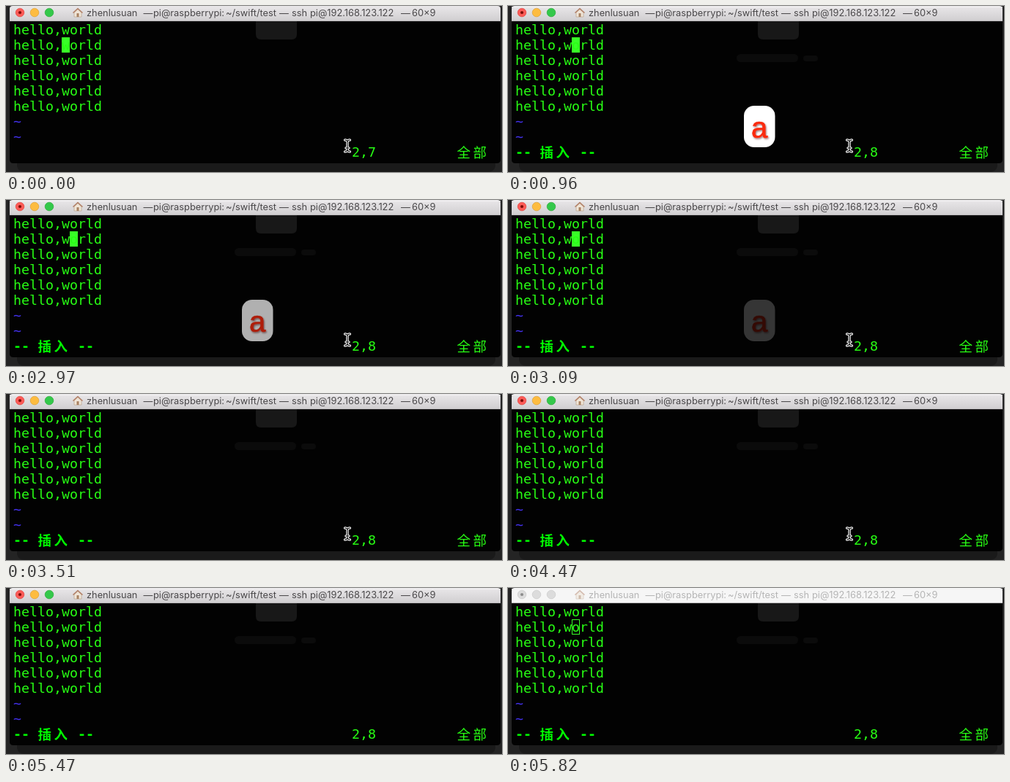
Recreate the animation shown at these times as an HTML page. Size 677x228 px, loop 5.98 s.

```html
<!DOCTYPE html>
<html lang="zh">
<head>
<meta charset="utf-8">
<title>Terminal</title>
<style>
  html, body { margin: 0; width: 100%; height: 100%; overflow: hidden; background: #242424; }
  svg { display: block; width: 677px; height: 228px; }
  text { white-space: pre; }
  .title { font: 12.8px Inter, Roboto, sans-serif; fill: #4a484a; }
  .mono { font: 18.27px "DejaVu Sans Mono", monospace; fill: #28fe14; }
  .cjk { font: 18.5px "Noto Sans CJK SC", "Noto Sans CJK", sans-serif; fill: #28fe14; }
  .bold { font-weight: 700; fill: #00ff00; }
  .tilde { fill: #4432f0; }
  .key { font: 40px "Liberation Sans", Arial, sans-serif; fill: #fb2a0b; stroke: #fb2a0b; stroke-width: .7; }
  .light { stroke-width: .7; }
  .idle .title { fill: #b5b5b5; }
  .idle .light { fill: #dcdcdc; stroke: #cbcbcb; }
  .idle .dot { fill: #8d8d8d; }
  .idle .house { opacity: .5; }
  .idle .bar { fill: #f6f6f6; }
</style>
</head>
<body>
<svg viewBox="0 0 677 228">
  <defs>
    <linearGradient id="chrome" x2="0" y2="1">
      <stop offset="0" stop-color="#e9e7e9"/>
      <stop offset="1" stop-color="#d0ced0"/>
    </linearGradient>
    <filter id="shade" x="-30%" y="-30%" width="160%" height="160%">
      <feDropShadow dx="1" dy="1.5" stdDeviation="1" flood-color="#5a1008" flood-opacity=".6"/>
    </filter>
  </defs>

  <rect width="677" height="228" fill="#242424"/>
  <path d="M15 214H668V220Q666 228 658 228H25Q17 228 15 220Z" fill="#1a1a1a"/>
  <path d="M5 20H675V211Q675 216 670 216H10Q5 216 5 211Z" fill="#020202"/>

  <path d="M341 20H397V39Q397 46 390 46H348Q341 46 341 39Z" fill="#181818"/>
  <g id="smudge" fill="#0b0b0b">
    <rect x="312" y="66" width="84" height="11" rx="5.5"/>
    <rect x="403" y="68" width="20" height="8" rx="4"/>
  </g>

  <g id="head">
    <path class="bar" d="M5 21V4Q5 0 9 0H671Q675 0 675 4V21Z" fill="url(#chrome)"/>
    <rect id="shine" x="5" y="1" width="670" height="1" fill="#f3f2f3"/>
    <rect x="5" y="20" width="670" height="1" fill="#b3b1b3"/>
    <circle class="light" cx="19" cy="9" r="5.8" fill="#fc5b57" stroke="#e2443f"/>
    <circle class="dot" cx="19" cy="9" r="2.1" fill="#7c0d09"/>
    <circle class="light" cx="39" cy="9" r="5.8" fill="#fdbc40" stroke="#dfa033"/>
    <circle class="light" cx="59" cy="9" r="5.8" fill="#34c84a" stroke="#27aa35"/>
    <g class="house">
      <path d="M93 9L98 4.5L103 9V15H93Z" fill="#efe4d6" stroke="#b9a48f" stroke-width=".7"/>
      <path d="M91.5 9.5L98 3.5L104.5 9.5" fill="none" stroke="#b27f66" stroke-width="1.6"/>
      <rect x="96.5" y="10" width="3" height="5" fill="#a98262"/>
    </g>
    <text class="title" y="14"><tspan x="110">zhenlusuan</tspan><tspan x="184"> — </tspan><tspan x="201">pi@raspberrypi:</tspan><tspan x="300">~/swift/test</tspan><tspan x="373">—</tspan><tspan x="390">ssh</tspan><tspan x="415">pi@192.168.123.122</tspan><tspan x="539">—</tspan><tspan x="554">60×9</tspan></text>
  </g>

  <rect id="block" y="43" width="11" height="21" fill="#38fe27"/>
  <rect id="outline" x="87.5" y="43.5" width="10" height="20" fill="none" stroke="#38fe27"/>
  <g id="screen"></g>
  <g id="mode">
    <text class="mono bold" x="10" y="207">--</text>
    <text class="cjk bold" x="43.5 65.5" y="207.5">插入</text>
    <text class="mono bold" x="98" y="207">--</text>
  </g>
  <text class="mono" id="ruler" x="472" y="207"></text>
  <text class="cjk" x="615.5 637.5" y="207.5">全部</text>

  <g id="cap">
    <rect x="322" y="137" width="42.5" height="57" rx="14" fill="#fff"/>
    <text class="key" x="343" y="181" text-anchor="middle" filter="url(#shade)">a</text>
  </g>

  <g id="beam" fill="none" stroke-linecap="round">
    <path id="ibeam" d="M-3.5 -8Q0 -8 0 -5V5Q0 8 -3.5 8M3.5 -8Q0 -8 0 -5M0 5Q0 8 3.5 8M-2 3H2" stroke="#f2f2f2" stroke-width="3"/>
    <use href="#ibeam"/>
    <path d="M-3.5 -8Q0 -8 0 -5V5Q0 8 -3.5 8M3.5 -8Q0 -8 0 -5M0 5Q0 8 3.5 8M-2 3H2" stroke="#111" stroke-width="1.1"/>
  </g>
</svg>
<script>
  const LOOP = 5980, KEY = 900, INSERT = 960, MOVE = 4640, GONE = 4990, IDLE = 5820;
  const $ = id => document.getElementById(id);
  const show = (id, on) => { $(id).style.display = on ? '' : 'none'; };

  // [time, block cursor visible]
  const blinks = [[0, 1], [420, 0], [INSERT, 1], [2460, 0], [2970, 1], [3510, 0],
                  [3990, 1], [4470, 0], [GONE, 1], [5470, 0]];
  // [time, key cap opacity]
  const fades = [[0, 0], [KEY, 1], [2970, .69], [3030, .44], [3090, .2], [3150, 0]];
  const at = (steps, t) => steps.filter(s => s[0] <= t).pop()[1];

  for (let row = 0; row < 8; row++) {
    const line = document.createElementNS('http://www.w3.org/2000/svg', 'text');
    line.setAttribute('class', row < 6 ? 'mono' : 'mono tilde');
    line.setAttribute('x', 10);
    line.setAttribute('y', 39 + 21 * row);
    line.textContent = row < 6 ? 'hello,world' : '~';
    $('screen').append(line);
  }

  function movePointer(t) {
    const step = Math.max(0, Math.floor((t - MOVE) / 58) + 1);
    const p = Math.min(1, step / 6) ** 1.5;
    $('beam').setAttribute('transform', `translate(${466 + 102 * p} ${192 + 42 * p})`);
    show('beam', t < GONE);
  }

  function render(t) {
    const inserting = t >= INSERT;
    show('shine', t >= 60);
    show('smudge', inserting);
    show('mode', inserting);
    $('ruler').textContent = inserting ? '2,8' : '2,7';
    $('block').setAttribute('x', inserting ? 87 : 76);
    show('block', at(blinks, t));
    show('outline', t >= IDLE);
    $('head').setAttribute('class', t >= IDLE ? 'idle' : '');
    $('cap').setAttribute('opacity', at(fades, t));
    movePointer(t);
  }

  const start = performance.now();
  function tick() {
    render((performance.now() - start) % LOOP);
    requestAnimationFrame(tick);
  }
  tick();
</script>
</body>
</html>
```
